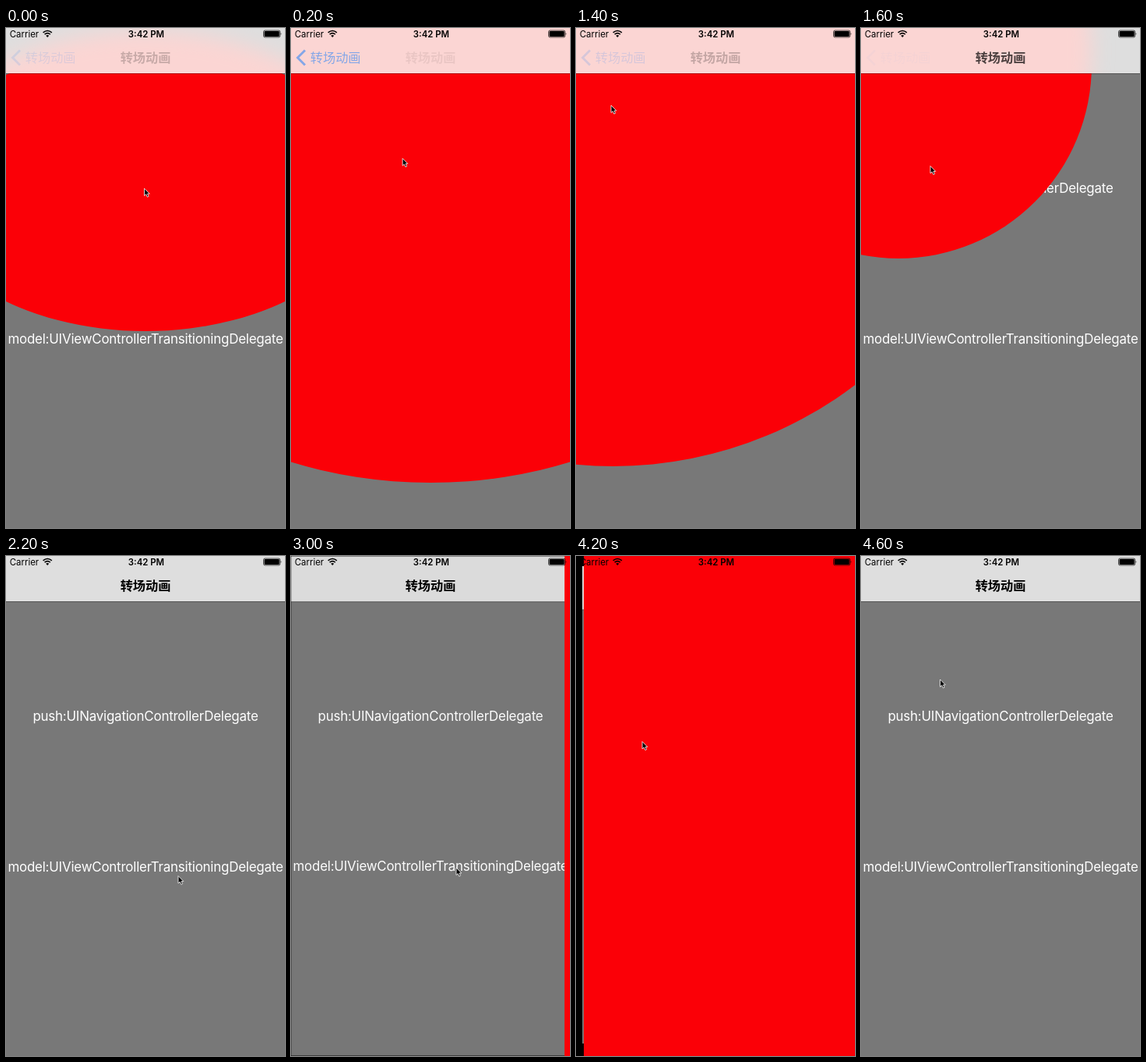
An HTML page that plays this animation: 358x640 px, repeating every 4.8 s.

```html
<!DOCTYPE html>
<html lang="zh">
<head>
<meta charset="utf-8">
<title>转场动画</title>
<style>
  html, body { margin: 0; width: 100%; height: 100%; overflow: hidden; background: #000; }
  svg { display: block; width: 358px; height: 640px; }
  text { font-family: Inter, Roboto, sans-serif; }
  .label { font-size: 16.9px; letter-spacing: -.2px; fill: #fff; text-anchor: middle; }
  .nav { font-family: "Noto Sans CJK SC", "Noto Sans CJK", sans-serif; font-size: 16.2px; }
  .title { font-weight: 700; text-anchor: middle; }
  .status { font-size: 11.4px; }
  .clock { font-weight: 600; text-anchor: middle; }
  .red { fill: #fb0007; }
</style>
</head>
<body>
<svg viewBox="0 0 358 640">
  <defs>
    <clipPath id="barClip"><rect width="358" height="58"/></clipPath>
    <clipPath id="pageClip"><rect width="358" height="640"/></clipPath>
    <filter id="blur" filterUnits="userSpaceOnUse" x="-80" y="-80" width="518" height="220">
      <feGaussianBlur stdDeviation="13"/>
    </filter>
  </defs>
  <rect width="358" height="640"/>

  <g id="home" clip-path="url(#pageClip)">
    <rect width="358" height="640" fill="#787878"/>
    <text class="label" x="179" y="211">push:UINavigationControllerDelegate</text>
    <text class="label" x="179" y="403.5">model:UIViewControllerTransitioningDelegate</text>
    <ellipse class="red hole"/>
    <g clip-path="url(#barClip)">
      <rect width="358" height="59" fill="#dedede"/>
      <g filter="url(#blur)">
        <ellipse class="hole" fill="#fbd5d3" transform="translate(0 -18)"/>
      </g>
    </g>
    <rect y="58" width="358" height="1" opacity=".3"/>
    <text id="title" class="nav title" x="179" y="44">转场动画</text>
    <g id="back">
      <path d="M18 28.5 8.5 38 18 47.5" fill="none" stroke="#1079fb" stroke-width="2.9"/>
      <text class="nav" x="24.8" y="44" fill="#1079fb">转场动画</text>
    </g>
    <rect id="dim" width="358" height="640"/>
  </g>

  <rect id="modal" class="red" width="358" height="640"/>

  <g class="status">
    <text x="4.8" y="11.6">Carrier</text>
    <path d="M47.6 5.9Q53.2 1.1 58.8 5.9M49.6 8.1Q53.2 5.1 56.8 8.1"
          fill="none" stroke="#000" stroke-width="1.6"/>
    <path d="M51.2 9.7Q53.2 8.2 55.2 9.7L53.2 11.9Z"/>
    <text class="clock" x="180" y="11.6">3:42 PM</text>
    <rect x="330.5" y="3.1" width="21.2" height="8.8" rx="1.8" fill="none" stroke="#000" stroke-width=".7"/>
    <rect x="331.5" y="4.1" width="19.2" height="6.8" rx="1"/>
    <path d="M352.6 5.9q1.5 1.6 0 3.2z"/>
  </g>

  <path id="cursor" d="M0 0V9.4L2.2 7.5 3.8 11 5.5 10.2 4 6.9H6.8Z"
        stroke="#fff" stroke-width=".8" stroke-linejoin="round"/>
</svg>
<script>
const LOOP = 4800, STEP = 200, POP = 1400;
const $ = id => document.getElementById(id);
const holes = document.querySelectorAll('.hole');

const ease = (t, start, length) => {
  const p = Math.min(1, Math.max(0, (t - start) / length));
  return p * p * (3 - 2 * p);
};

// Where the pointer turns or rests; it moves straight between.
const stops = [
  { t: 0, x: 177.5, y: 205.3 },
  { t: 800, x: 40, y: 51.5 },
  { t: 1200, x: 40, y: 43 },
  { t: POP, x: 45, y: 99 },
  { t: 2200, x: 221, y: 409.5 },
  { t: 3000, x: 212, y: 399 },
  { t: 3800, x: 212, y: 399 },
  { t: 4200, x: 85, y: 237.5 },
  { t: 4600, x: 101.5, y: 158 },
  { t: LOOP, x: 177.5, y: 205.3 }
];

function pointer(t) {
  const i = stops.findIndex(s => s.t > t), a = stops[i - 1], b = stops[i];
  const p = (t - a.t) / (b.t - a.t);
  return [a.x + (b.x - a.x) * p, a.y + (b.y - a.y) * p];
}

// The push opens from its label, the pop closes on the back button.
function hole(t) {
  if (t < POP) {
    const ry = 183 + t * .97;
    return { cx: 179, cy: 205, rx: ry + 110, ry };
  }
  const r = Math.max(0, 514 - (t - POP) * 1.33);
  return { cx: 48, cy: 47, rx: r, ry: r };
}

function crossFade(t) {
  const pushing = t < POP;
  const p = pushing ? ease(t, -150, 700) : ease(t, POP - 180, 600);
  const leaving = (1 - p) ** 2 / 4;
  $('back').setAttribute('opacity', pushing ? p : leaving);
  $('title').setAttribute('opacity', pushing ? leaving : p);
}

function present(t) {
  const p = ease(t, 2975, 300) - ease(t, 4170, 300);
  $('home').setAttribute('transform',
    `translate(179 ${320 - 1.5 * p}) scale(${1 - .0465 * p}) translate(-179 -320)`);
  $('dim').setAttribute('opacity', t < 4200 ? p / 2 : 0);
  $('modal').setAttribute('x', 358 * (1 - p));
}

function draw(now) {
  const t = Math.floor(now % LOOP / STEP) * STEP;
  const shape = hole(t);
  for (const el of holes)
    for (const key in shape) el.setAttribute(key, shape[key]);
  crossFade(t);
  present(t);
  $('cursor').setAttribute('transform', `translate(${pointer(t).join(' ')})`);
}

const start = performance.now();
function loop() {
  draw(performance.now() - start);
  requestAnimationFrame(loop);
}
loop();
</script>
</body>
</html>
```
